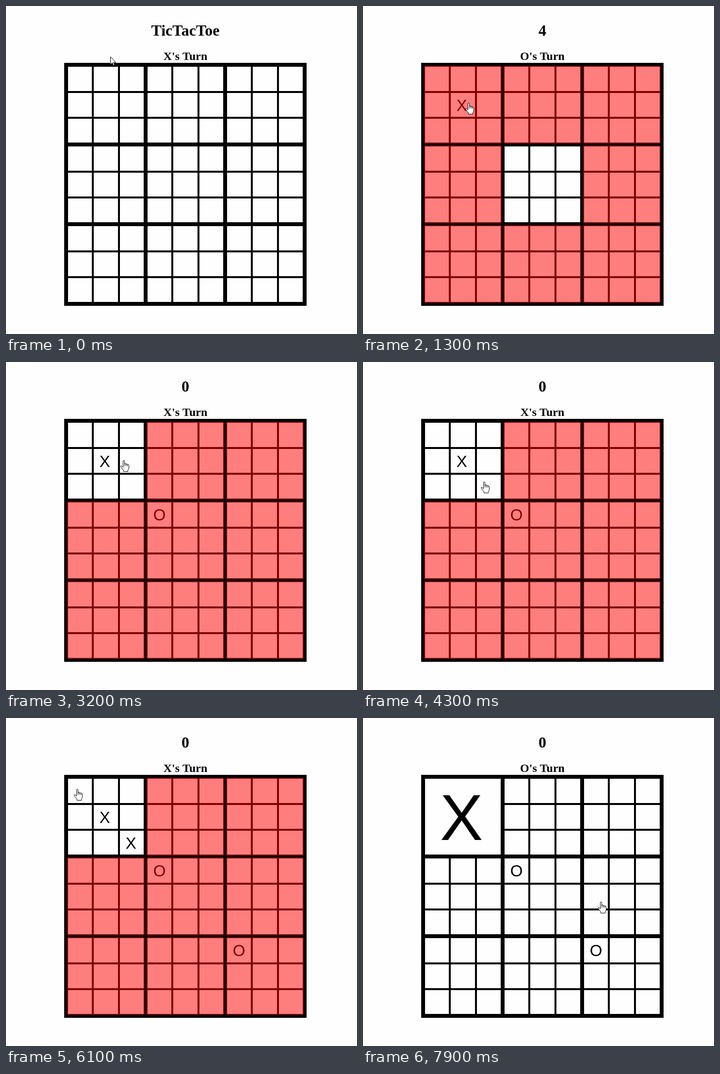
Write an HTML page with a canvas that moves like this. It is 724 by 675 pixels and loops after 8000 ms.

```html
<!DOCTYPE html>
<html>
<head>
<meta charset="utf-8">
<style>
  html, body { margin: 0; width: 100%; height: 100%; overflow: hidden; background: #fefefe; }
  canvas { display: block; }
</style>
</head>
<body>
<canvas id="stage" width="724" height="675"></canvas>
<script>
const ctx = document.getElementById('stage').getContext('2d');
const LOOP = 8000, STEP = 100;
const PAPER = '#fefefe';
const LEFT = 126, TOP = 123.4, PITCH = 164, SIZE = 160, CELL = SIZE / 3;
const ANY = -1;

// Where the pointer arrives and when; a click follows one step later
const path = [
  { t: 0, x: 209, y: 104 },
  { t: 1200, x: 211, y: 199, click: true },
  { t: 1500, x: 202, y: 195 },
  { t: 1800, x: 313, y: 267 },
  { t: 2300, x: 329, y: 330 },
  { t: 2500, x: 317, y: 311, click: true },
  { t: 2900, x: 317, y: 310 },
  { t: 3200, x: 236, y: 202 },
  { t: 3600, x: 139, y: 195 },
  { t: 4300, x: 243, y: 246, click: true },
  { t: 5200, x: 475, y: 472, click: true },
  { t: 5400, x: 419, y: 392 },
  { t: 6100, x: 140, y: 146 },
  { t: 6200, x: 140, y: 146, click: true },
  { t: 6900, x: 139, y: 146 },
  { t: 7100, x: 223, y: 220 },
  { t: 7400, x: 374, y: 339 },
  { t: 7900, x: 484, y: 378 }
];
const REST = 300, LONGEST_GLIDE = 700;
const FINGERTIP = 6;

const arrow = new Path2D('M.5 .5V16.5L4.2 13L6.7 18.6L9 17.6L6.6 12H11.5Z');
const hand = new Path2D('M5.5 15V2.5Q5.5 .5 7 .5Q8.5 .5 8.5 2.5V8Q8.7 6.6 10 6.6Q11.5 6.8 11.5 9' +
  'Q11.8 7.6 13 7.6Q14.5 7.8 14.5 10Q14.8 8.9 16 9Q17.5 9.3 17.5 11V16Q17.5 18 15.5 20.5V23.5H6.5V21' +
  'L2 15.5Q0 13 .8 12Q2 10.8 5.5 15Z');
const knuckles = new Path2D('M8.5 8V12M11.5 9V12M14.5 10V12.5');

const column = i => i % 3;
const row = i => Math.floor(i / 3);
const cellX = (b, c) => Math.round(LEFT + column(b) * PITCH + column(c) * CELL);
const cellY = (b, c) => Math.round(TOP + row(b) * PITCH + row(c) * CELL);

function cellUnder(x, y) {
  const dx = x + FINGERTIP - LEFT, dy = y - TOP;
  const index = (unit, u, v) => Math.floor(v / unit) * 3 + Math.floor(u / unit);
  return { board: index(PITCH, dx, dy), cell: index(CELL, dx % PITCH, dy % PITCH) };
}

// In a magic square, three cells form a line when they add up to 15
const magic = c => +'816357492'[c];

function hasLine(cells) {
  return cells.some((a, i) => cells.slice(i + 1).some((b, j) =>
    cells.slice(i + j + 2).some(c => magic(a) + magic(b) + magic(c) === 15)));
}

// Replay all clicks made so far; the cell chosen decides the next open board
function gameAt(t) {
  const game = { title: 'TicTacToe', player: 'X', open: ANY, marks: [], winners: {} };
  for (const { x, y } of path.filter(p => p.click && p.t + STEP <= t)) {
    const { board, cell } = cellUnder(x, y);
    const player = game.player;
    game.marks.push({ board, cell, player });
    const own = game.marks.filter(m => m.board === board && m.player === player);
    if (hasLine(own.map(m => m.cell))) game.winners[board] = player;
    game.title = cell;
    game.open = game.winners[cell] ? ANY : cell;
    game.player = player === 'X' ? 'O' : 'X';
  }
  return game;
}

function pointerAt(t) {
  let { x, y } = path[0];
  for (let i = 1; i < path.length; i++) {
    const end = path[i].t;
    const start = Math.min(end, Math.max(path[i - 1].t + REST, end - LONGEST_GLIDE));
    if (t < start) break;
    const p = Math.min(1, (t - start + STEP) / (end - start + STEP));
    const eased = p * p * (3 - 2 * p);
    x += (path[i].x - x) * eased;
    y += (path[i].y - y) * eased;
  }
  return [Math.round(x), Math.round(y)];
}

const sans = size => `${size}px "Liberation Sans", Arial, sans-serif`;
const serif = size => `bold ${size}px "Liberation Serif", "Times New Roman", serif`;

function fill(color, x, y, w, h) {
  ctx.fillStyle = color;
  ctx.fillRect(x, y, w, h);
}

function text(str, font, x, y) {
  ctx.font = font;
  ctx.textAlign = 'center';
  ctx.fillStyle = '#000';
  ctx.fillText(str, x, y);
}

function drawBoard(b, game) {
  const x = cellX(b, 0), y = cellY(b, 0);
  if (game.winners[b]) {
    fill(PAPER, x + 2, y + 2, SIZE - 4, SIZE - 4);
    text(game.winners[b], sans(133), x + 77, y + 128);
  } else {
    for (let c = 0; c < 9; c++) {
      const left = cellX(b, c), top = cellY(b, c);
      const right = Math.round(x + (column(c) + 1) * CELL);
      const bottom = Math.round(TOP + row(b) * PITCH + (row(c) + 1) * CELL);
      fill(PAPER, left + 2, top + 2, right - left - 4, bottom - top - 4);
    }
    for (const { board, cell, player } of game.marks) {
      if (board !== b) continue;
      const center = player === 'X' ? 24.7 : 26.5;
      text(player, sans(33), cellX(b, cell) + center, cellY(b, cell) + 39);
    }
  }
  if (game.open !== ANY && game.open !== b) fill('rgba(255,0,0,.5)', x, y, SIZE, SIZE);
}

function drawPointer(t) {
  const [x, y] = pointerAt(t);
  const overCells = y > TOP;
  const shape = overCells ? hand : arrow;
  ctx.save();
  ctx.translate(overCells ? x : x + FINGERTIP, y);
  ctx.fillStyle = '#fff';
  ctx.strokeStyle = '#000';
  ctx.fill(shape);
  ctx.stroke(shape);
  if (overCells) ctx.stroke(knuckles);
  ctx.restore();
}

function draw(now) {
  const t = Math.floor((now % LOOP) / STEP) * STEP;
  const game = gameAt(t);
  fill(PAPER, 0, 0, 724, 675);
  text(game.title, serif(32), 370, 61);
  text(game.player + "'s Turn", serif(24), 370, 111);
  fill('#000', 120, 117, 500, 500);
  for (let b = 0; b < 9; b++) drawBoard(b, game);
  drawPointer(t);
}

const origin = performance.now();
function loop() {
  draw(performance.now() - origin);
  requestAnimationFrame(loop);
}
loop();
</script>
</body>
</html>
```
